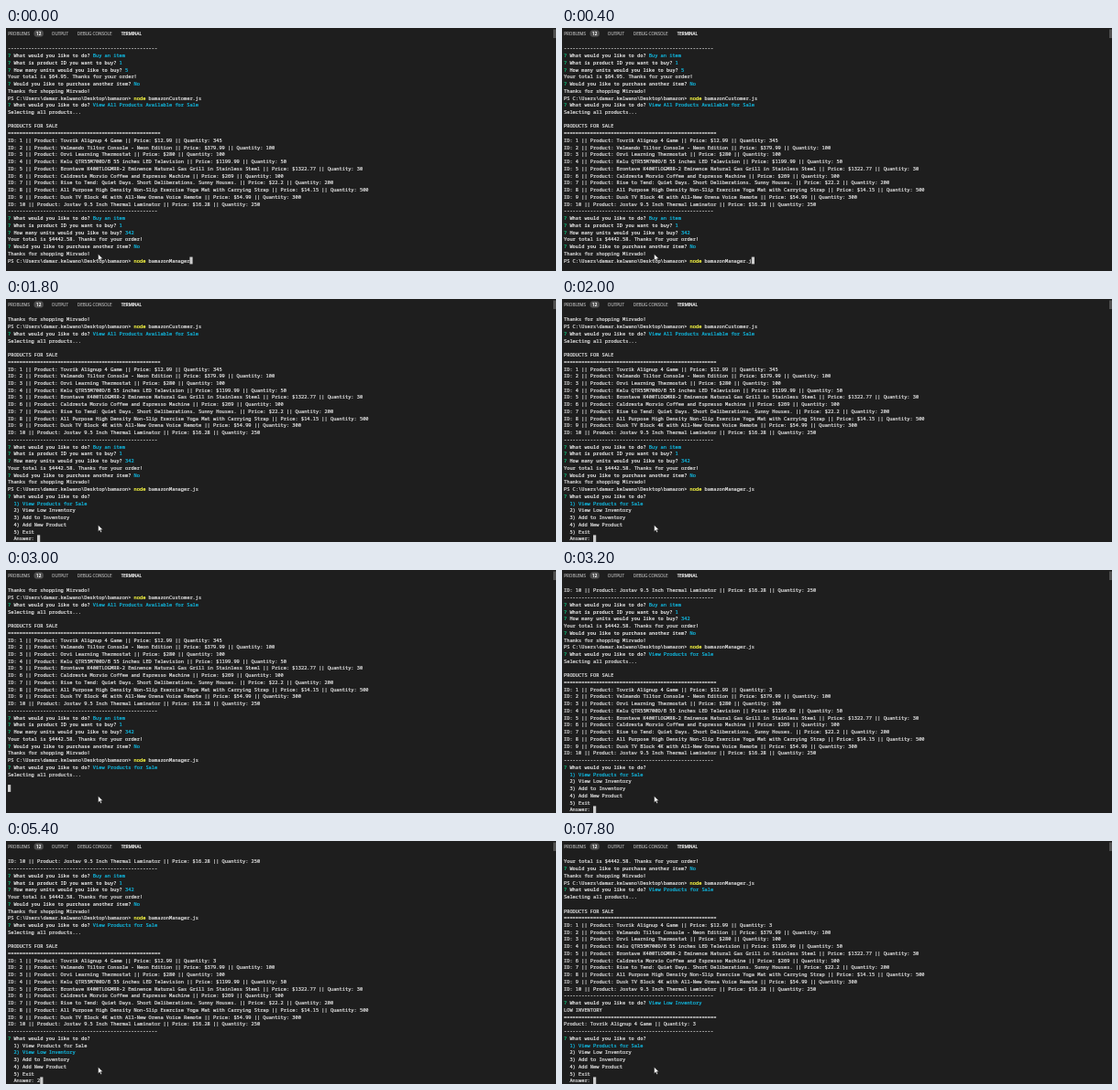
An HTML page for the animation above (8 s loop, 600 by 266 pixels).

```html
<!DOCTYPE html>
<html lang="en">
<head>
<meta charset="utf-8">
<title>Terminal session</title>
<style>
  html, body { margin: 0; width: 100%; height: 100%; overflow: hidden; background: #1e1e1e; }
  #stage { position: relative; width: 600px; height: 266px; overflow: hidden; background: #1e1e1e; }
  /* Text is laid out at ten times its size so that advances stay exact. */
  #sheet { position: absolute; left: 0; top: 0; width: 6000px; height: 2660px; transform: scale(.1); transform-origin: 0 0; }
  pre { position: absolute; left: 20px; top: 184px; margin: 0; color: #d4d4d4; visibility: hidden;
        font: 53.3333px/77.4px "Noto Sans Mono", monospace; -webkit-text-stroke: 2.5px; }
  pre.on { visibility: visible; }
  b { color: #e5e5e5; -webkit-text-stroke: 0; }
  .q { color: #0dbc79; }
  .a { color: #11b0d6; }
  .cmd { color: #f5f543; }
  .cur { display: inline-block; width: 32px; height: 77.4px; vertical-align: top; background: #ccc; }
  .tab, .badge { position: absolute; font: 46px/64px "Open Sans", sans-serif; -webkit-text-stroke: 2.5px; }
  .tab { top: 29px; color: #9a9a9a; white-space: pre; }
  .tab.active { color: #f0f0f0; }
  .badge { left: 304px; top: 22px; width: 106px; height: 76px; border-radius: 38px;
           background: #4d4d4d; color: #fff; line-height: 76px; text-align: center; }
  .slider { position: absolute; left: 5970px; top: 15px; width: 30px; height: 95px; background: #4f4f4f; }
  svg { position: absolute; left: 100px; top: 246.5px; }
</style>
</head>
<body>
<div id="stage">
  <div id="sheet">
    <span class="tab" style="left:22px">PROBLEMS</span>
    <span class="badge">12</span>
    <span class="tab" style="left:498px">OUTPUT</span>
    <span class="tab" style="left:778px">DEBUG CONSOLE</span>
    <span class="tab active" style="left:1257px">TERMINAL</span>
    <span class="slider"></span>
  </div>
  <svg width="7" height="10" viewBox="0 0 7 10">
    <path d="M.6 .5V7.4L2.2 6L3.3 8.6L4.5 8.1L3.4 5.6H5.6Z" fill="#fff" stroke="#111" stroke-width=".4"/>
  </svg>
</div>
<script>
const LOOP = 8000;
const span = (cls, text) => `<span class="${cls}">${text}</span>`;
const ask = (text, reply = '') => `${span('q', '?')} <b>${text}</b> ${span('a', reply)}`;
const todo = reply => ask('What would you like to do?', reply);
const run = file => `PS C:\\Users\\damar.kelwano\\Desktop\\bamazon&gt; ${span('cmd', 'node')} ${file}`;
const cursor = span('cur', '');
const dash = '-'.repeat(51), rule = '='.repeat(52);

const products = [
  ['Tovrik Alignup 4 Game', 12.99, 345],
  ['Velmando Tiltor Console - Neon Edition', 379.99, 100],
  ['Orvi Learning Thermostat', 280, 100],
  ['Kelu QTR55M700D/B 55 inches LED Television', 1199.99, 50],
  ['Brontave K400TLOGMRR-2 Eminence Natural Gas Grill in Stainless Steel', 1322.77, 30],
  ['Caldresta Morvio Coffee and Espresso Machine', 269, 100],
  ['Rise to Tend: Quiet Days. Short Deliberations. Sunny Houses.', 22.2, 200],
  ['All Purpose High Density Non-Slip Exercise Yoga Mat with Carrying Strap', 14.15, 500],
  ['Dusk TV Block 4K with All-New Orena Voice Remote', 54.99, 300],
  ['Jostav 9.5 Inch Thermal Laminator', 16.28, 250]
];

const list = firstQty => [
  'Selecting all products...', '', 'PRODUCTS FOR SALE', rule,
  ...products.map(([name, price, qty], i) =>
    `ID: ${i + 1} || Product: ${name} || Price: $${price} || Quantity: ${i ? qty : firstQty}`),
  dash
];

const order = (units, total) => [
  todo('Buy an item'),
  ask('What is product ID you want to buy?', '1'),
  ask('How many units would you like to buy?', units),
  `Your total is $${total}. Thanks for your order!`,
  ask('Would you like to purchase another item?', 'No'),
  'Thanks for shopping Mirvado!'
];

const options = ['View Products for Sale', 'View Low Inventory', 'Add to Inventory', 'Add New Product', 'Exit'];
const menu = (picked, typed = '') => [
  todo(),
  ...options.map((text, i) => {
    const item = `  ${i + 1}) ${text}`;
    return i === picked ? span('a', item) : item;
  }),
  `  Answer: ${typed}${cursor}`
];

const log = [
  dash, ...order('5', '64.95'),
  run('bamazonCustomer.js'), todo('View All Products Available for Sale'), ...list(345),
  ...order('342', '4442.58'),
  run('bamazonManager.js'), todo(options[0]), ...list(3),
  todo(options[1]), 'LOW INVENTORY', rule, `Product: ${products[0][0]} || Quantity: 3`, dash
];

const typing = ext => [run('bamazonManager' + ext) + cursor];

// start time, first and end line of the log, live lines below
const steps = [
  [0, 0, 30, typing('')],
  [200, 0, 30, typing('.')],
  [400, 0, 30, typing('.j')],
  [600, 0, 30, typing('.js')],
  [1000, 0, 31, [cursor]],
  [1800, 6, 31, menu(0)],
  [3000, 6, 34, [cursor]],
  [3200, 22, 47, menu(0)],
  [5200, 22, 47, menu(1, '2')],
  [7800, 27, 52, menu(0)]
];

const sheet = document.getElementById('sheet');
const screens = steps.map(([, from, to, live]) => {
  const pre = document.createElement('pre');
  pre.innerHTML = [...log.slice(from, to), ...live].join('\n');
  return sheet.appendChild(pre);
});

const start = performance.now();
let shown = -1;
function draw() {
  const t = (performance.now() - start) % LOOP;
  const now = steps.filter(step => step[0] <= t).length - 1;
  if (now !== shown) {
    screens.forEach((el, i) => el.classList.toggle('on', i === now));
    shown = now;
  }
  requestAnimationFrame(draw);
}
draw();
</script>
</body>
</html>
```
